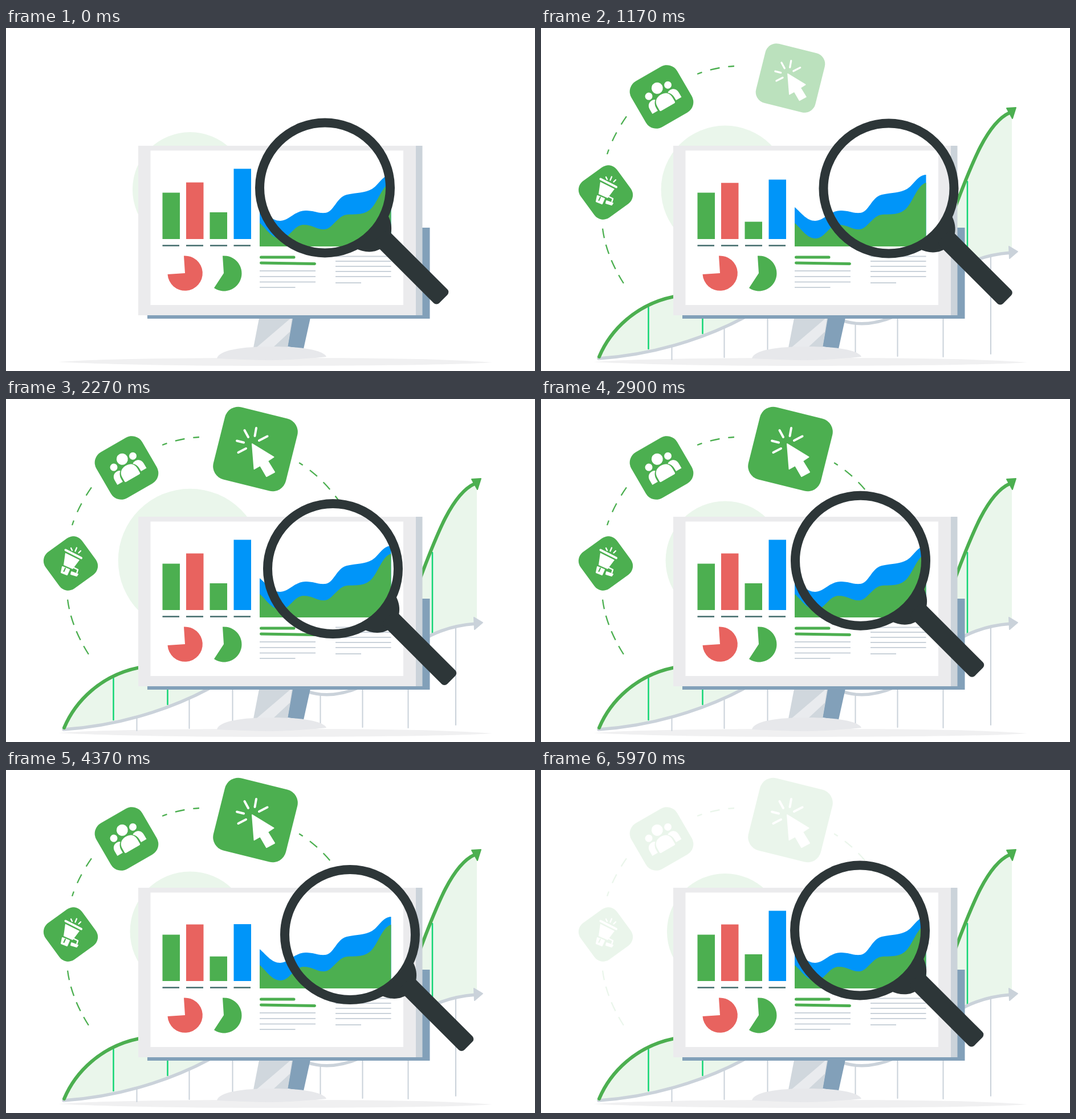
An HTML page for the animation above (6.01 s loop, 928 by 603 pixels).

```html
<!DOCTYPE html>
<html lang="en">
<head>
<meta charset="utf-8">
<title>Analytics</title>
<style>
  html, body { margin: 0; width: 100%; height: 100%; overflow: hidden; background: #fff; }
  svg { display: block; width: 928px; height: 603px; }
  .line { fill: none; stroke-linecap: round; }
  .green { fill: #4caf50; }
  .blue { fill: #0095f9; }
  .red { fill: #e8635f; }
  .tint { fill: #eaf6eb; }
  .grey { stroke: #cad2da; }
  .leaf { stroke: #4caf50; }
  .white { fill: #fff; }
  .ray { stroke: #fff; fill: none; stroke-linecap: round; }
</style>
</head>
<body>
<svg viewBox="0 0 928 603">
  <defs>
    <clipPath id="wipe"><rect id="wipeRect" x="90" y="0" width="0" height="603"/></clipPath>
  </defs>

  <path fill="#f0f0f1" d="M92 587C180 581 320 580 473 580S770 581 853 588C770 593 600 594 473 594S180 592 92 587Z"/>
  <circle id="halo" class="tint" cx="323" cy="284" r="101"/>

  <g id="chart" clip-path="url(#wipe)">
    <path class="tint" d="M101 580C120 535 165 482 245 470H360V507C280 550 190 575 101 581Z"/>
    <path class="tint" d="M715 345C745 270 775 170 826 146V395Q770 399 715 430Z"/>
    <path class="line grey" stroke-width="2" d="M229.500 560V583M321.500 527V579M397.500 509V578M551.500 520V578M625.500 509V577M705.500 509V578M789 400V573"/>
    <path class="line" stroke="#12d574" stroke-width="2.500" d="M188.500 491V564M283.500 509V537M748 270V412"/>
    <path class="line grey" stroke-width="5.500" d="M101 581C190 575 280 550 360 507M525 513Q568 529 620 507M730 424Q770 399 824 395"/>
    <path class="line leaf" stroke-width="6" d="M102 578C120 535 165 482 245 470M715 345C745 270 775 170 822 149"/>
    <path fill="#cad2da" stroke="#cad2da" stroke-width="2" stroke-linejoin="round" d="M821 384L836 393L822 405Z"/>
    <path class="green leaf" stroke-width="2" stroke-linejoin="round" d="M817 141L833 140L827 159Z"/>
  </g>

  <g id="monitor">
    <path fill="#82a0b9" d="M503 505H535L522 564L494 560Z"/>
    <path fill="#d0d7dd" d="M445 505H504L494 562H434Z"/>
    <path fill="#e9ebee" d="M440 561L502 508L498 534L468 562Z"/>
    <path fill="#e7e8eb" d="M370 581C373 566 415 560 466 560S556 566 562 578Q500 584 466 584T370 581Z"/>
    <path fill="#82a0b9" d="M730 351H743.500V511H248V504H730Z"/>
    <path fill="#cbd3da" d="M718 207H730.500V505H718Z"/>
    <path fill="#ebebed" d="M232 207H719V505H232Z"/>
    <path class="white" d="M253.500 215.500H697V487H253.500Z"/>
  </g>

  <g id="screen">
    <g id="bars"></g>
    <path stroke="#416b6b" stroke-width="2.500" d="M274.500 382.500H304M316 382.500H346M358 382.500H388M399.500 382.500H429"/>
    <path class="red" d="M314 431L312 400.500A30.700 30.700 0 1 1 283.500 433Z"/>
    <path class="green" d="M382 431L380 400.500A31 31 0 1 1 365 457Z"/>
    <path class="blue" d="M445 315C458 326 466 339 481 339S507 321 525 321S545 326 560 325S580 297 598 293S630 290 642 283S660 259 675.500 258V384H445Z"/>
    <path class="green" d="M445 343C458 354 466 370 482 370S505 346 522 346S545 355 559 354S582 329 599 328S628 329 640 318S660 276 675.500 272V384H445Z"/>
    <path class="line leaf" stroke-width="5" d="M447.500 403H505M447.500 413L541.500 414.500"/>
    <path class="grey" stroke-width="2" d="M445 427H543M445 437H543M445 446.500H543M445 456H507.500M578 401.500H675.500M578 410H675.500M578 419H675.500M578 428H675.500M578 437H675.500M578 448H623"/>
  </g>

  <g id="steps">
    <g id="trails"></g>

    <g class="icon">
      <rect class="green" x="74" y="249.500" width="79" height="79" rx="19" transform="rotate(-36 113.500 289)"/>
      <path class="ray" stroke-width="2.300" d="M114 262L116 266M124 261.500L121.500 267.500M131 267L127.500 270.500"/>
      <path class="ray" stroke-width="4" d="M104.500 265.500L132 279.500"/>
      <path class="white" d="M104 270.500L129 283L117 299L101 292Z"/>
      <path class="ray" stroke-width="2.500" fill="none" stroke-linejoin="round" d="M118 296L126 300L124.500 305"/>
      <path class="white" stroke="#fff" stroke-width="2" stroke-linejoin="round" d="M99 295L111 300L107 309L97 305ZM115 304L126 308L124 311L114 308Z"/>
      <path class="line leaf" stroke-width="2" d="M104 297.500L101.500 303"/>
    </g>

    <g class="icon">
      <g transform="translate(211.500 121) rotate(-30)">
        <rect class="green" x="-46.500" y="-46.500" width="93" height="93" rx="21"/>
        <g class="white">
          <circle cx="1" cy="-17" r="10"/>
          <circle cx="-19" cy="-12" r="6.500"/>
          <circle cx="20" cy="-12.500" r="6.500"/>
          <path d="M-29 18V9C-29 1-24-3-18-3Q-14-3-12-1Q-18 4-18 12V18Z"/>
          <path d="M30 18V9C30 1 25-3 19-3Q15-3 13-1Q19 4 19 12V18Z"/>
          <path d="M-15 19V11C-15 1-8-4 1-4S16 1 16 11V19Q16 21 14 21H-13Q-15 21-15 19Z"/>
        </g>
      </g>
    </g>

    <g class="icon">
      <rect class="green" x="372" y="22.500" width="131" height="131" rx="24" transform="rotate(14 437.500 88)"/>
      <path class="ray" stroke-width="4" d="M405 73.500L417 76.500M407.500 94L421 87M418.500 55L425 67M439 51L436.500 65M458.500 65.500L444 73"/>
      <path class="white" stroke="#fff" stroke-width="2" stroke-linejoin="round" d="M432 79L469.500 102L459 109L471 128.500L457 136L446 117L435.500 123Z"/>
    </g>
  </g>

  <g id="lens" fill="#2d3638">
    <circle r="114.500" fill="none" stroke="#2d3638" stroke-width="16"/>
    <path d="M53 106C70 115 90 115 103 103C118 88 122 66 108 44Z"/>
    <rect x="128" y="-25.700" width="157" height="34" rx="7" transform="rotate(45)"/>
  </g>
</svg>

<script>
const LOOP = 6010, CYCLE = 3000;
const $ = id => document.getElementById(id);
const clamp = v => Math.max(0, Math.min(1, v));
const ramp = (t, start, length) => clamp((t - start) / length);

function add(parent, tag, attrs) {
  const el = document.createElementNS('http://www.w3.org/2000/svg', tag);
  for (const key in attrs) el.setAttribute(key, attrs[key]);
  return parent.appendChild(el);
}

// Screen bars: each one dips and grows back in turn.
const FLOOR = 371;
const bars = [
  { x: 274.5, h: 81.5, dip: 34, start: 200, color: 'green' },
  { x: 316, h: 99.5, dip: 33, start: 430, color: 'red' },
  { x: 357.5, h: 47, dip: 24, start: 680, color: 'green' },
  { x: 399.5, h: 123.5, dip: 29, start: 925, color: 'blue' }
];
for (const bar of bars) {
  bar.el = add($('bars'), 'rect', { class: bar.color, x: bar.x, width: 30.5 });
}

// Dashed trails, uncovered along their length by a mask.
const trails = [
  { d: 'M145 449Q114 400 108 352', dash: '17 12', shift: 0, start: 30, length: 150 },
  { d: 'M116 222Q127 188 151 154', dash: '17 16', shift: 8, start: 340, length: 210 },
  { d: 'M274 81Q305 69 339 67', dash: '17 15', shift: 8, start: 745, length: 340 },
  { d: 'M514 112Q552 135 584 179', dash: '17 15', shift: 9, start: 1290, length: 310 }
];
trails.forEach((trail, i) => {
  const mask = add(document.querySelector('defs'), 'mask', {
    id: 'trail' + i, maskUnits: 'userSpaceOnUse', x: 0, y: 0, width: 928, height: 603
  });
  trail.cover = add(mask, 'path', {
    d: trail.d, pathLength: 1, fill: 'none', stroke: '#fff', 'stroke-width': 8
  });
  const holder = add($('trails'), 'g', { mask: `url(#trail${i})` });
  add(holder, 'path', {
    d: trail.d, class: 'line leaf', 'stroke-width': 2.3,
    'stroke-dasharray': trail.dash, 'stroke-dashoffset': trail.shift,
    style: 'stroke-linecap:butt'
  });
});

const icons = [
  { x: 113.5, y: 289, start: 150 },
  { x: 211.5, y: 121, start: 555 },
  { x: 437.5, y: 88, start: 1100 }
];
document.querySelectorAll('.icon').forEach((el, i) => icons[i].el = el);

// Lens path: time, x, y.
const path = [
  [0, 559.5, 281], [250, 567, 272], [470, 578, 268], [800, 598.5, 270],
  [1050, 610, 277], [1170, 610, 282], [1370, 603.5, 289.5], [1650, 595, 297],
  [1900, 587.5, 301], [2070, 581.5, 300.5], [2270, 573.5, 298.5], [2700, 565.5, 290]
];

function knot(i) {
  const n = path.length, turn = Math.floor(i / n);
  const [t, x, y] = path[i - turn * n];
  return [t + turn * CYCLE, x, y];
}

// Smooth curve through the knots, closed over one cycle.
function lensAt(t) {
  let i = path.length - 1;
  while (path[i][0] > t) i--;
  const [a, b, c, d] = [-1, 0, 1, 2].map(k => knot(i + k));
  const span = c[0] - b[0], u = (t - b[0]) / span, v = 1 - u;
  return [1, 2].map(k => {
    const m0 = (c[k] - a[k]) / (c[0] - a[0]) * span;
    const m1 = (d[k] - b[k]) / (d[0] - b[0]) * span;
    return b[k] * (1 + 2 * u) * v * v + m0 * u * v * v
      + c[k] * u * u * (3 - 2 * u) - m1 * u * u * v;
  });
}

function draw(t) {
  const u = t % CYCLE;
  const pulse = 1 - Math.abs(t % 1500 / 750 - 1);
  $('halo').setAttribute('r', 101 + 26 * pulse);
  $('wipeRect').setAttribute('width', 760 * ramp(t, 20, 600));

  for (const bar of bars) {
    const p = ramp(u, bar.start, 750);
    const h = bar.h - bar.dip * (1 - Math.abs(2 * p - 1));
    bar.el.setAttribute('y', FLOOR - h);
    bar.el.setAttribute('height', h);
  }

  for (const trail of trails) {
    const p = ramp(t, trail.start, trail.length);
    trail.cover.setAttribute('stroke-dasharray', p + ' 2');
    trail.cover.setAttribute('visibility', p ? 'visible' : 'hidden');
  }

  for (const { el, x, y, start } of icons) {
    const p = ramp(t, start, 190), s = 0.71 + 0.29 * p;
    el.setAttribute('opacity', p);
    el.setAttribute('transform', `translate(${x} ${y}) scale(${s}) translate(${-x} ${-y})`);
  }
  $('steps').setAttribute('opacity', 1 - ramp(t, 5655, 355));

  $('lens').setAttribute('transform', `translate(${lensAt(u).join(' ')})`);
}

const begin = performance.now();
function tick() {
  draw((performance.now() - begin) % LOOP);
  requestAnimationFrame(tick);
}
tick();
</script>
</body>
</html>
```
